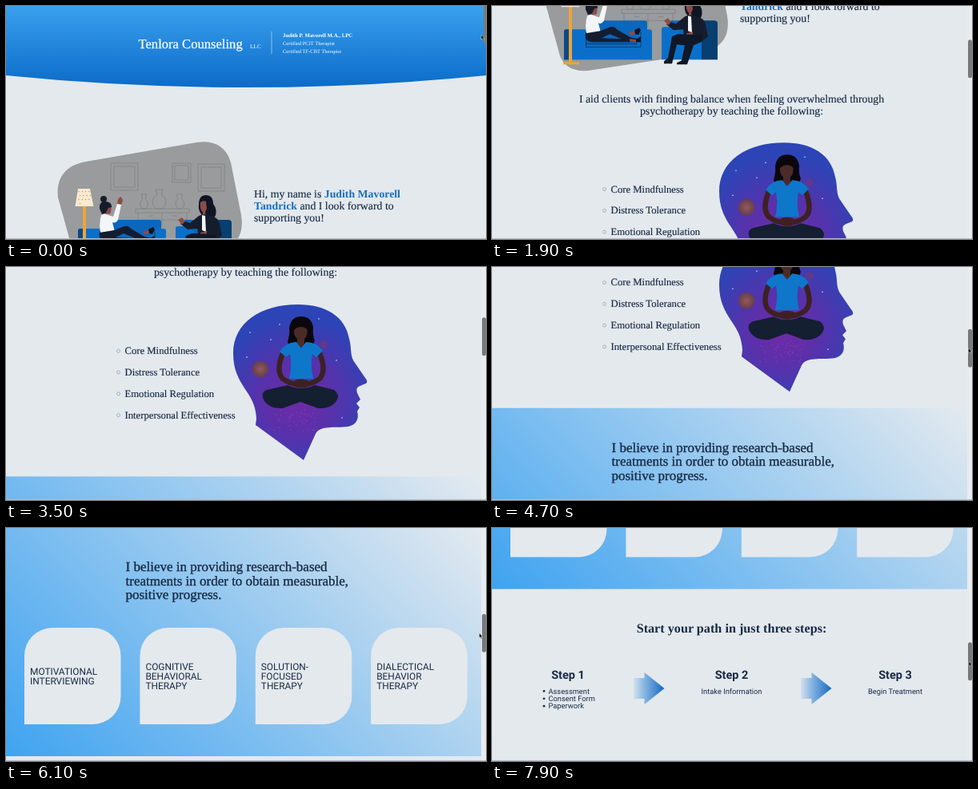
An HTML page for the animation above (8 s loop, 600 by 292 pixels).

```html
<!DOCTYPE html>
<html lang="en">
<head>
<meta charset="utf-8">
<title>Counseling page scroll</title>
<style>
html, body { margin: 0; width: 100%; height: 100%; overflow: hidden; background: #e4e9ed; }
svg { display: block; width: 100vw; height: 100vh; }
text { font-family: "Liberation Serif", Times, serif; font-size: 13.8px; fill: #182b46; stroke: #182b46; stroke-width: .15px; text-rendering: geometricPrecision; }
.mid { text-anchor: middle; }
.name { font-weight: bold; fill: #146fc0; stroke: none; }
.white text { fill: #fff; stroke: none; font-size: 6.5px; }
.white .brand { font-size: 16.6px; stroke: #fff; stroke-width: .25px; }
.item { font-size: 12.7px; }
.claim { font-size: 17px; stroke-width: .35px; }
.head { font-size: 16.2px; font-weight: bold; stroke: none; }
.card, .step, .note { font-family: Roboto, Arial, sans-serif; stroke: none; }
.card { font-size: 11.9px; }
.step { font-size: 14.5px; font-weight: bold; }
.note { font-size: 9.3px; }
.line { fill: none; stroke: #7f8284; stroke-width: .8; }
</style>
</head>
<body>
<svg viewBox="0 0 600 292" preserveAspectRatio="none">
<defs>
  <linearGradient id="top" x2="0" y2="1"><stop stop-color="#3aa0ed"/><stop offset="1" stop-color="#0b6bc8"/></linearGradient>
  <linearGradient id="band" gradientUnits="userSpaceOnUse" x1="77" y1="1001" x2="519" y2="559"><stop stop-color="#3fa3f0"/><stop offset=".33" stop-color="#74baf0"/><stop offset="1" stop-color="#e4eaef"/></linearGradient>
  <linearGradient id="arrow"><stop stop-color="#d3e1ed"/><stop offset=".35" stop-color="#87b5e1"/><stop offset="1" stop-color="#1768c4"/></linearGradient>
  <radialGradient id="space" gradientUnits="userSpaceOnUse" cx="364" cy="165" r="102"><stop stop-color="#702aa6"/><stop offset=".45" stop-color="#5831ab"/><stop offset="1" stop-color="#2d44b6"/></radialGradient>
  <radialGradient id="planet"><stop stop-color="#945a58"/><stop offset="1" stop-color="#643d52"/></radialGradient>
</defs>
<g id="page">
  <!-- header -->
  <path fill="url(#top)" d="M0 0H600V87Q300 117 0 87Z"/>
  <path stroke="#8cc0ee" d="M332 32V60"/>
  <g class="white">
    <text class="brand" x="165.500" y="53">Tenlora Counseling</text>
    <text x="305" y="53" style="font-size:7.4px">LLC</text>
    <text x="346" y="39.300" style="font-size:6.8px;font-weight:bold">Judith P. Mavorell M.A., LPC</text>
    <text x="346" y="49.200">Certified PCIT Therapist</text>
    <text x="346" y="59.200">Certified TF-CBT Therapist</text>
  </g>

  <!-- therapy room -->
  <g transform="translate(0 171)">
    <path fill="#999b9c" d="M65 69C62 41 78 28 100 24L238 0C262-4 276 7 281 25L294 91C299 121 282 133 262 138L125 159C100 163 87 153 83 134Z"/>
    <g class="line">
      <path d="M131 26h34v34h-34zM135 30h26v26h-26zM208 26h23v24h-23zM211 29h17v18h-17zM240 27h33v34h-33zM244 31h25v26h-25z"/>
      <path d="M162 83h67v5h-67zM165 88v35M226 88v35M165 97H226M195 88v18M178 92h6M208 92h6"/>
      <path d="M169 65h7l-2 5q6 6 1 13h-5q-5-7 1-13zM187 59h9l-2 6q11 8 2 18h-9q-9-10 2-18zM213 65h8l-2 5q7 6 1 13h-5q-6-7 0-13z"/>
    </g>
    <!-- sofa and client -->
    <path fill="#0a67bd" d="M117 100q0-3 3-3h71q3 0 3 3v40h-77z"/>
    <path fill="#0b6fc9" d="M90 146V111q0-3 3-3h22q3 0 3 3v17h63v-17q0-3 3-3h13q3 0 3 3v35z"/>
    <path fill="#084a86" d="M90 146V111q0-3 3-3h3v38z"/>
    <path stroke="#073e72" fill="none" d="M117.500 111v19H186V111M118 126h64"/>
    <circle cx="122" cy="71" r="4" fill="#161c2b"/>
    <path fill="#8c4c4a" d="M124 80q4-3 8 0l-1 8q-2 3-4 1l-1 4h-5zM139 77l1-6 3-3 2 2 1 3-2 5z"/>
    <path fill="#161c2b" d="M117 83q-1-9 7-9 8 0 8 7l-4 1-3 6-5 2z"/>
    <path fill="#f4f5f6" d="M119 91q5-3 9 0l6 2 5-16 5 1-4 19q-3 5-7 3l3 12-17 4q-4-12 0-25z"/>
    <path fill="#141d30" d="M117 113l18-3 13-5q5-1 8 3l17 10 9 2-1 4-12-1-22-9-10 5 27 1 10 1-1 3h-48q-10-1-8-11z"/>
    <path fill="#8c4c4a" d="M171 112l8-3 2 3-7 4zM172 120l10 1-1 3-9-1z"/>
    <path fill="#0d1423" d="M178 109l6-3 2 3-3 6-4-1zM180 120l6-3v7h-6z"/>
    <!-- lamp -->
    <path fill="#eda438" d="M96 79h4v70h9v3H89v-3h7z"/>
    <path fill="#f8ead0" d="M90 58h15l4.500 22h-23z"/>
    <g id="dots" fill="#c68c55"></g>
    <!-- armchair and listener -->
    <path fill="#0a67bd" d="M222 100q0-3 3-3h46v40h-49z"/>
    <path fill="#0b6fc9" d="M212 146V108q0-3 3-3h16q3 0 3 3v12h29v26z"/>
    <path fill="#073f70" d="M262 146V101q0-4 4-4h12q4 0 4 4v45z"/>
    <path fill="#0f1523" d="M241 78q0-12 9-12 9 0 9 11 5 6 3 14-2 6-8 4l-9-4q-5-5-4-13z"/>
    <path fill="#8c4c4a" d="M243 75q4-3 7-1l1 9-2 4 1 7h-4v-7q-4-2-3-12z"/>
    <path fill="#151d2d" d="M241 92l5-2 11 2q8 2 10 10l3 15-9 7-20-1-2-15-12 1-9-7 3-4 9 3z"/>
    <path fill="#f4f5f6" d="M245 91l4 1 1 20-5-2z"/>
    <path fill="#8c4c4a" d="M215 97l5-3 4 5-4 4zM243 113l8-2v4l-8 2z"/>
    <path fill="#101827" d="M262 115l-30-1-7 3-5 27-5 4v3h10l6-24 10 1-4 19-6 3v2h13l8-24 11-5z"/>
  </g>
  <text x="310" y="240.300">Hi, my name is <tspan class="name">Judith Mavorell</tspan></text>
  <text x="310" y="255.200"><tspan class="name">Tandrick</tspan> and I look forward to</text>
  <text x="310" y="270">supporting you!</text>

  <text class="mid" x="299.500" y="370.300">I aid clients with finding balance when feeling overwhelmed through</text>
  <text class="mid" x="299.500" y="385.300">psychotherapy by teaching the following:</text>
  <g id="skills"></g>

  <!-- mindful head -->
  <g transform="translate(0 374)">
    <path fill="url(#space)" d="M365 47C318 47 284 70 284 108C284 150 312 155 313 190L312 198L372 242L387 209C393 198 410 202 428 200C440 197 441 188 439 181L442 176L438 171L443 166L439 158C437 150 440 150 450 146Q453 143 449 139L434 117C430 108 432 100 429 90C424 62 400 47 365 47Z"/>
    <g id="stars"></g>
    <circle cx="318" cy="128" r="10.500" fill="url(#planet)"/>
    <circle cx="397" cy="97" r="5" fill="#60398b"/>
    <path fill="#0a080d" d="M352 94Q355 84 354 77Q356 62 369 62Q382 62 384 76Q383 86 386 92Q385 98 377 98H359Q353 98 352 94Z"/>
    <path fill="none" stroke="#3d2122" stroke-width="6.500" stroke-linecap="round" d="M346 108Q337 130 346 140Q355 147 366 147M392 108Q401 130 392 140Q383 147 372 147"/>
    <path fill="#4b2b27" d="M360 76Q368 70 376 75Q378 86 373 90V97L369 101L364 97V90Q359 86 360 76Z"/>
    <path fill="#0a080d" d="M358 82Q359 67 369 66Q379 67 379 82Q376 75 368 75Q362 75 358 82Z"/>
    <path fill="#0e77ca" d="M342 106Q350 94 363 94L369 102L375 94Q388 94 396 105L388 113L383 109Q380 122 384 140H354Q358 122 355 109L350 113Z"/>
    <path fill="#141f31" d="M352 148Q369 156 386 148L410 154Q418 160 413 168Q406 178 390 177L368 169L346 177Q330 178 323 168Q317 158 326 154Z"/>
    <ellipse cx="369" cy="146" rx="11" ry="5.500" fill="#3d2122"/>
  </g>

  <!-- approaches -->
  <path fill="url(#band)" d="M0 636.500H594V923.500H0Z"/>
  <text class="claim" x="149.500" y="691.500">I believe in providing research-based</text>
  <text class="claim" x="149.500" y="709">treatments in order to obtain measurable,</text>
  <text class="claim" x="149.500" y="726.500">positive progress.</text>
  <g id="cards"></g>

  <!-- steps -->
  <text class="head mid" x="299.500" y="978.300">Start your path in just three steps:</text>
  <g id="steps"></g>
</g>
<path fill="#b3bfcd" d="M0 291H600V292H0Z"/>
<path id="track" fill="#e8ecef" d="M594 0H600V291H594Z"/>
<rect id="thumb" width="5" height="48" rx="2.500" fill="#77797b"/>
<path id="cursor" fill="#111" stroke="#fff" stroke-width=".4" d="M0 0V6L1.400 4.800L2.500 7L3.500 6.500L2.500 4.300H4.300Z"/>
</svg>
<script>
const el = id => document.getElementById(id);
const fill = (id, parts) => el(id).innerHTML = parts.join('');
const text = (cls, x, y, s) => `<text class="${cls}" x="${x}" y="${y}">${s}</text>`;
const dot = (x, y, r, extra = '') => `<circle cx="${x}" cy="${y}" r="${r}" ${extra}/>`;

let seed = 7;
const rand = () => (seed = seed * 16807 % 2147483647) / 2147483647;

fill('dots', Array.from({ length: 13 }, (_, i) =>
  dot(91 + i % 4 * 4.3 + (i >> 2) % 2 * 1.5, 61.5 + (i >> 2) * 5, .7)));

fill('skills', ['Core Mindfulness', 'Distress Tolerance', 'Emotional Regulation', 'Interpersonal Effectiveness']
  .map((s, i) => {
    const y = 483.3 + i * 26.8;
    return dot(140.5, y - 4, 2, 'fill="none" stroke="#929ba6" stroke-width=".7"') + text('item', 148.5, y, s);
  }));

const bright = [[305, 82], [331, 91], [391, 65], [420, 189], [413, 117], [325, 158], [342, 72], [301, 113]];
fill('stars', [
  ...bright.map(([x, y]) => dot(x, y, .8, 'fill="#e5dcfa"')),
  ...Array.from({ length: 60 }, () => dot(335 + rand() * 55, 177 + rand() * 30, .5, 'fill="#a744ad"'))
]);

const cards = ['MOTIVATIONAL|INTERVIEWING', 'COGNITIVE|BEHAVIORAL|THERAPY', 'SOLUTION-|FOCUSED|THERAPY', 'DIALECTICAL|BEHAVIOR|THERAPY'];
fill('cards', cards.map((s, i) => {
  const x = 23 + i * 144.4, lines = s.split('|');
  return `<path fill="#e4e9ed" d="M${x} 883.5V797.5a35 35 0 0 1 35-35h50.500a35 35 0 0 1 35 35v51a35 35 0 0 1-35 35z"/>` +
    lines.map((l, n) => text('card', x + 7, 827.2 + (n - (lines.length - 1) / 2) * 12.1, l)).join('');
}));

fill('steps', [
  ...[1, 2, 3].map((n, i) => text('step mid', 95 + i * 204.5, 1036.2, 'Step ' + n)),
  ...['Assessment', 'Consent Form', 'Paperwork'].map((s, i) => {
    const y = 1054.6 + i * 9.4;
    return dot(65, y - 3.2, 1.4, 'fill="#182b46"') + text('note', 70.5, y, s);
  }),
  text('note mid', 299.5, 1054.6, 'Intake Information'),
  text('note mid', 504, 1054.6, 'Begin Treatment'),
  ...[177, 386].map(x => `<path fill="url(#arrow)" d="M${x} 1035h13.500v-7l25 20-25 20v-7h-13.500z"/>`)
]);

// Each key is [time in ms, value]; slopes keep the curve monotone.
const scrollKeys = [[0, 0], [1300, 171], [2600, 325], [3500, 374], [4700, 459.8], [6100, 637.5], [7900, 847]];
const cursorX = [[0, 594], [600, 601], [4200, 601], [4700, 595.5], [6100, 591.5], [7900, 596]];
const cursorGap = [[0, 36], [4200, 24], [7900, 24]];

const segment = (keys, t) => Math.max(1, keys.findIndex(k => k[0] >= t));
const rate = (keys, i) => (keys[i][1] - keys[i - 1][1]) / (keys[i][0] - keys[i - 1][0]);

function linear(keys, t) {
  const i = segment(keys, t);
  return keys[i - 1][1] + rate(keys, i) * (t - keys[i - 1][0]);
}

function slope(keys, i) {
  if (i === 0) return rate(keys, 1);
  if (i === keys.length - 1) return rate(keys, i);
  const a = rate(keys, i), b = rate(keys, i + 1);
  return 2 * a * b / (a + b);
}

function smooth(keys, t) {
  const i = segment(keys, t), [t0, a] = keys[i - 1], [t1, b] = keys[i];
  const h = t1 - t0, u = (t - t0) / h, v = 1 - u;
  return a * v * v * (1 + 2 * u) + b * u * u * (1 + 2 * v) +
    h * u * v * (slope(keys, i - 1) * v - slope(keys, i) * u);
}

const start = performance.now();
function draw(now) {
  const t = Math.floor(Math.max(0, now - start) % 8000 / 100) * 100;
  const scroll = smooth(scrollKeys, t), top = scroll * .169;
  el('page').setAttribute('transform', `translate(0 ${-scroll})`);
  el('track').style.display = t ? '' : 'none';
  el('thumb').setAttribute('x', t ? 595 : 597);
  el('thumb').setAttribute('y', top);
  el('cursor').setAttribute('transform', `translate(${linear(cursorX, t)} ${top + linear(cursorGap, t)})`);
  requestAnimationFrame(draw);
}
draw(start);
</script>
</body>
</html>
```
